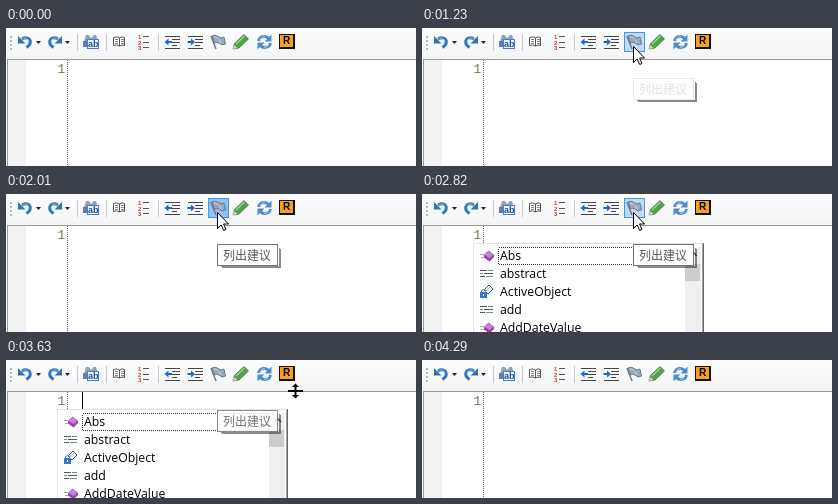
An HTML page that plays this animation: 410x138 px, repeating every 4410 ms.

```html
<!DOCTYPE html>
<html lang="zh-CN">
<head>
<meta charset="utf-8">
<style>
html, body { margin: 0; width: 100%; height: 100%; overflow: hidden; background: #fff; }
svg { display: block; }
rect, .crisp { shape-rendering: crispEdges; }
.list text { font: 12.3px "Open Sans", "Noto Sans", sans-serif; fill: #000; }
</style>
</head>
<body>
<svg width="410" height="138" viewBox="0 0 410 138">
  <defs>
    <linearGradient id="bar" x2="0" y2="1">
      <stop offset="0" stop-color="#fdfdfe"/><stop offset="1" stop-color="#f4f5f7"/>
    </linearGradient>
    <g id="undo">
      <path d="M16 11C23 7 28 14 20.500 19.500" fill="none" stroke="#2f73b8" stroke-width="3"/>
      <path d="M12 8V15.500H19.500Z" fill="#2f73b8"/>
      <path d="M17 10.500C22 8.500 25 13 21 17.500" fill="none" stroke="#8fbfe8"/>
    </g>
    <path id="drop" d="M0 0H5L2.500 3Z" fill="#222"/>
    <path id="sep" class="crisp" d="M.5 6V23" stroke="#c5c8cf"/>
    <g id="lines" class="crisp">
      <path d="M0 .5H15M7 3.500H15M7 6.500H15M7 9.500H12M0 12.500H15" stroke="#444"/>
    </g>
    <g id="method">
      <path class="crisp" d="M0 4.500H4M1 7.500H4" stroke="#a9a9b8"/>
      <path d="M4 5L8.500 .5L14 5V7L9.500 11.500L4 7.500Z" fill="#9a3fae"/>
      <path d="M4.500 5L8.500 1L13 5L9.500 8Z" fill="#c983d8"/>
    </g>
    <g id="keyword" class="crisp">
      <path d="M0 2.500H7M4 5.500H13M0 8.500H5" stroke="#50565c"/>
      <path d="M8 2.500H13M0 5.500H3M6 8.500H13" stroke="#6c9070"/>
    </g>
    <g id="object">
      <path d="M4 4L9 -1L13 3L8 8Z" fill="#eef3fa" stroke="#46566e"/>
      <path d="M6 5L10 1" stroke="#9fb6d2"/>
      <rect x="0" y="6" width="7" height="6" rx="1" fill="#3a78c4"/>
      <path d="M1.500 6V4.500Q3.500 2.500 5.500 4.500V6" fill="none" stroke="#3a78c4"/>
      <rect x="3" y="8" width="1" height="2" fill="#fff"/>
    </g>
    <g id="beam" class="crisp">
      <path d="M-3 -8.500H0M1 -8.500H4M-3 7.500H0M1 7.500H4M.5 -8V7" stroke="#000"/>
    </g>
    <g id="split">
      <path d="M-7 -1H-.5V-4H-3L.5 -7.500L4 -4H1.500V-1H8V1H1.500V4H4L.5 7.500L-3 4H-.5V1H-7Z" fill="#000"/>
    </g>
    <path id="arrow" d="M.5 .5V16.500L4.200 13L6.700 18.500L9 17.500L6.600 12H11.500Z" fill="#fff" stroke="#000"/>
  </defs>

  <rect width="410" height="28" fill="url(#bar)"/>
  <rect y="28" width="410" height="3" fill="#f3f3f4"/>
  <path class="crisp" d="M5 8V22" stroke="#b4b7be" stroke-width="2" stroke-dasharray="2 2"/>

  <use href="#undo"/>
  <use href="#undo" transform="translate(68) scale(-1 1)"/>
  <use href="#drop" x="30" y="13"/>
  <use href="#drop" x="59" y="13"/>
  <use href="#sep" x="71"/>
  <use href="#sep" x="100"/>
  <use href="#sep" x="152"/>

  <g id="find">
    <path d="M78 14L80 7H83L84.500 9.500H86L87.500 7H90L92 13Z" fill="#8ba4c6"/>
    <rect x="77" y="13" width="4" height="6" fill="#5f7fae"/>
    <rect x="81.500" y="11.500" width="11" height="9" fill="#f4f9ff" stroke="#4a7dbb"/>
    <text x="82" y="19" font-family="Liberation Sans, sans-serif" font-size="9" font-weight="bold" fill="#174f98">ab</text>
  </g>

  <path d="M107.500 9.500Q111 8 113.500 10Q116 8 118.500 9.500V17.500Q116 16 113.500 18Q111 16 107.500 17.500ZM113.500 10V18" fill="#fff" stroke="#555"/>
  <path class="crisp" d="M109 11.500H112M109 13.500H112M109 15.500H112M115 11.500H118M115 13.500H118M115 15.500H118" stroke="#888"/>

  <g font-family="Liberation Sans, sans-serif" font-size="6" font-weight="bold" fill="#d23a2e">
    <text x="132" y="11">1</text><text x="132" y="16.500">2</text><text x="132" y="22">3</text>
  </g>
  <path class="crisp" d="M137 8.500H143M137 14.500H143M137 19.500H143" stroke="#555"/>

  <use href="#lines" x="159" y="8"/>
  <use href="#lines" x="182" y="8"/>
  <path d="M158.500 14L162.500 10.500V13H166V15H162.500V17.500Z" fill="#2367c0"/>
  <path d="M189 14L185 10.500V13H181.500V15H185V17.500Z" fill="#2367c0"/>

  <rect id="hot" x="202.500" y="4.500" width="20" height="19" stroke="#3f97ee"/>
  <path d="M205 8L210 21" stroke="#6d7787" stroke-width="1.500"/>
  <path d="M206 8Q209 6 212 8.500T218 9L219.500 16Q216 18 213.500 15.500T208.500 15Z" fill="#9aa9bf" stroke="#63728a" stroke-width=".9"/>
  <path d="M208 9Q210 8.500 212 10.500M213.500 11.500L215 15" fill="none" stroke="#ccd6e3"/>

  <path d="M227 21L228.500 15.500L238 6.500L242.500 11L233 20Z" fill="#4fa446" stroke="#3c7a37" stroke-width=".8"/>
  <path d="M230 16L238.500 8" stroke="#9bd08c" stroke-width="1.500"/>
  <path d="M227 21L228 17L231.500 20Z" fill="#e4d6b4"/>

  <g fill="none" stroke="#4f8cca" stroke-width="3">
    <path d="M252.500 13Q253.500 8.500 258.500 8.500Q261 8.500 262.500 10.500"/>
    <path d="M264.500 15Q263.500 19.500 258.500 19.500Q256 19.500 254.500 17.500"/>
  </g>
  <path d="M265.500 6.500V13.500H258.500ZM251.500 21.500V14.500H258.500Z" fill="#4f8cca"/>
  <path d="M254 12Q255 8.500 259 8.500M263 16Q262 19.500 258 19.500" fill="none" stroke="#a9cdf0"/>

  <rect x="273" y="6" width="16" height="15" rx="1.500" fill="#111"/>
  <rect x="274" y="7" width="13" height="12" fill="#f9a11b"/>
  <text x="277" y="16" font-family="Liberation Sans, sans-serif" font-size="10" font-weight="bold">R</text>

  <rect x="1" y="31" width="409" height="107" fill="#fff"/>
  <rect x="2" y="32" width="18" height="106" fill="#f2f2f2"/>
  <path class="crisp" d="M1.500 138V31.500H410" fill="none" stroke="#9c9c9c"/>
  <text x="51.500" y="44.500" font-family="Liberation Mono, monospace" font-size="13" fill="#6f7a55">1</text>
  <path class="crisp" d="M61.500 32V138" stroke="#707070" stroke-dasharray="1 1"/>
  <rect id="caret" x="76" y="32" width="1" height="17"/>

  <g id="list" class="list">
    <rect x="51" y="49" width="231" height="89" fill="#fff"/>
    <path class="crisp" d="M51.500 138V49.500H281" fill="none" stroke="#e3e3e3"/>
    <path class="crisp" d="M280.500 50V138" stroke="#a0a0a0"/>
    <path class="crisp" d="M281.500 49V138" stroke="#696969"/>
    <rect x="263" y="53" width="16" height="85" fill="#f0f0f0"/>
    <path d="M268 62L271.500 58.500L275 62" fill="none" stroke="#606060" stroke-width="1.500"/>
    <rect x="263" y="70" width="15" height="17" fill="#cdcdcd"/>
    <rect x="76.500" y="53.500" width="186" height="17" fill="none" stroke="#333" stroke-dasharray="1 1"/>
  </g>

  <path id="shade" class="crisp" d="M215 72.500H273.500V54M216 73.500H274.500V55" fill="none" stroke="#000" stroke-opacity=".45"/>
  <g id="tip">
    <rect x="211.500" y="50.500" width="60" height="21" fill="#fff" stroke="#767676"/>
    <text x="217" y="65.500" font-family="Noto Sans CJK SC, Noto Sans CJK, sans-serif" font-size="12" fill="#575757">列出建议</text>
  </g>
  <use id="mouse"/>
</svg>
<script>
const LOOP = 4410, STEP = 30;
const $ = id => document.getElementById(id);
const show = (id, on) => $(id).setAttribute('visibility', on ? 'visible' : 'hidden');
const clamp = v => Math.max(0, Math.min(1, v));
const within = (t, a, b) => t >= a && t < b;

const rows = [['Abs', 'method'], ['abstract', 'keyword'], ['ActiveObject', 'object'],
  ['add', 'keyword'], ['AddDateValue', 'method']];
$('list').innerHTML += rows.map(([word, icon], i) =>
  `<use href="#${icon}" x="58" y="${56 + i * 18}"/><text x="78" y="${66 + i * 18}">${word}</text>`).join('');

// time, x, y of the pointer
const path = [[120, 369, 85], [360, 285, 64], [630, 222, 44], [780, 215, 28], [900, 211, 20],
  [1049, 211, 20], [1050, 211, 18], [3480, 211, 18], [3540, 226, 20], [3630, 289, 31],
  [3780, 362, 52], [3930, 416, 66]];
const blinks = [[270, 810], [1320, 1830], [2340, 2820], [3360, 3900]];

function pointer(t) {
  const i = path.findIndex(p => p[0] > t);
  if (i < 1) return null;
  const [t0, x0, y0] = path[i - 1], [t1, x1, y1] = path[i];
  const k = (t - t0) / (t1 - t0);
  return [Math.round(x0 + (x1 - x0) * k), Math.round(y0 + (y1 - y0) * k)];
}

function draw(now) {
  const t = Math.floor(now % LOOP / STEP) * STEP;
  const at = pointer(t);
  show('mouse', at);
  let hover = false;
  if (at) {
    const [x, y] = at;
    hover = within(x, 202, 223) && y < 24;
    $('mouse').setAttribute('href', y < 25 ? '#arrow' : y < 34 ? '#split' : '#beam');
    $('mouse').setAttribute('transform', `translate(${x} ${y})`);
  }
  show('hot', hover);
  $('hot').setAttribute('fill', within(t, 2010, 2220) ? '#92c0f0' : '#c0daf4');
  show('caret', blinks.some(([a, b]) => within(t, a, b)));
  show('list', within(t, 2220, 4290));
  const fade = t < 2000 ? clamp((t - 1200) / 180) : clamp((3780 - t) / 180);
  $('tip').setAttribute('opacity', fade);
  show('shade', fade > 0);
  requestAnimationFrame(tick);
}

let start;
function tick() {
  const now = performance.now();
  start ??= now;
  draw(now - start);
}
tick();
</script>
</body>
</html>
```
